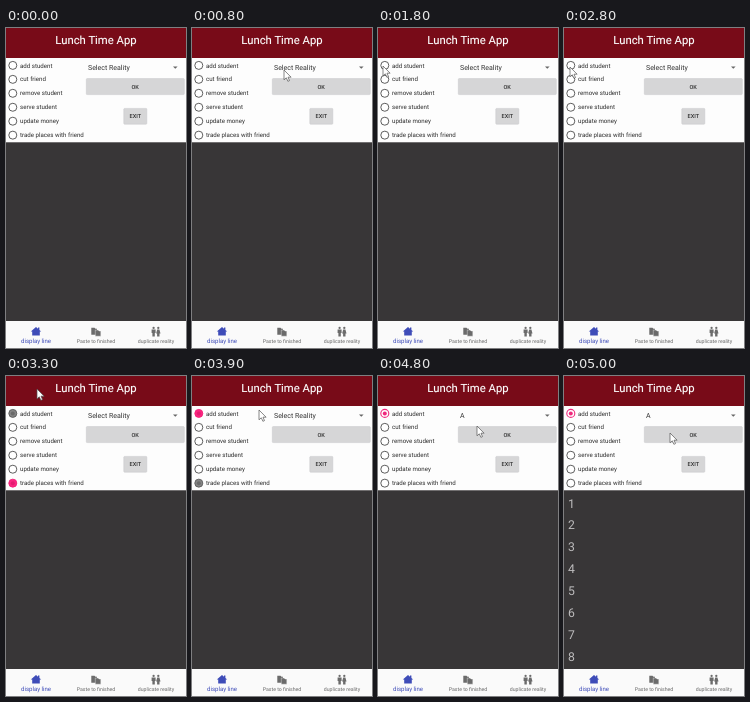
Animation, 180 px wide and 320 px high, one loop 5.1 s. Source, as an HTML page:

```html
<!DOCTYPE html>
<html lang="en">
<head>
<meta charset="utf-8">
<title>Lunch Time App</title>
<style>
  html, body { margin: 0; width: 100%; height: 100%; overflow: hidden; background: #fff; }
  svg { display: block; width: 100%; height: 100%; }
  text { font-family: Roboto, sans-serif; text-rendering: geometricPrecision; }
  .menu { font-size: 7px; fill: #333; }
  .label { font-size: 6.15px; fill: #2c2c2c; }
  .button { font-size: 5.6px; font-weight: 500; fill: #333; text-anchor: middle; }
  .tab { font-size: 5.2px; fill: #686868; text-anchor: middle; }
  .tab.active { font-size: 6.05px; fill: #3e4cb8; }
  .number { font-size: 12.2px; fill: #bdbcbd; }
  .ring { fill: #fff; stroke: #4c4c4c; stroke-width: 0.9; }
  .dot { fill: none; }
  .on .ring { stroke: #f0287c; stroke-width: 1.1; }
  .on .dot { fill: #f0287c; }
  .press .ring { fill: #fb2581; stroke: #f32078; }
  .press .dot { fill: #e31b70; }
  .fade .ring { fill: #858585; stroke: #5c5c5c; }
  .fade .dot { fill: #6a6a6a; }
</style>
</head>
<body>
<svg viewBox="0 0 180 320" preserveAspectRatio="none">
  <rect width="180" height="320" fill="#fdfdfd"/>
  <rect width="180" height="30" fill="#780b18"/>
  <text x="90" y="16.4" text-anchor="middle" font-size="11.3" fill="#fff" stroke="#fff" stroke-width=".15">Lunch Time App</text>

  <g id="radios"></g>

  <text id="choice" class="menu" x="82" y="42">Select Reality</text>
  <path d="M167 38.4h4.6l-2.3 2.3z" fill="#666"/>
  <g fill="#d6d6d7" stroke="#c6c6c8" stroke-width=".5">
    <rect x="80.3" y="50.6" width="98" height="16" rx=".8"/>
    <rect x="117.8" y="80.4" width="23" height="15.8" rx=".8"/>
  </g>
  <text class="button" x="129.2" y="60.7">OK</text>
  <text class="button" x="129.3" y="90.3">EXIT</text>

  <rect y="114.3" width="180" height="179" fill="#383637"/>
  <g id="list"></g>

  <rect y="293" width="180" height="27" fill="#fafafa"/>
  <path d="M24.8 303.6 30 299l2 1.7v-1.1h1.4v2.3l1.8 1.7h-1.4v3.9h-7.6v-3.9z" fill="#3e4cb8"/>
  <g fill="#6b6b6b">
    <path d="M85.3 299.8h3.2l1 1h1.5v6h-5.7z"/>
    <path d="M89.3 302h2.8l1 1h1.7v5.2h-5.5z" stroke="#fafafa" stroke-width=".4"/>
    <circle cx="147.6" cy="299.9" r="1.15"/>
    <circle cx="152.3" cy="299.9" r="1.15"/>
    <path d="M145.6 301.4h4v3.5h-.8v3.5h-2.4v-3.5h-.8z"/>
    <path d="M151.2 301.4h2.2l1.1 4h-1v3h-2.4v-3h-1z"/>
  </g>
  <text class="tab active" x="30" y="315.4">display line</text>
  <text class="tab" x="90" y="315.2">Paste to finished</text>
  <text class="tab" x="150" y="315.2">duplicate reality</text>

  <g id="popup">
    <rect x="78.2" y="30.4" width="81.8" height="30" fill="#000" opacity=".13"/>
    <rect x="78.8" y="29.8" width="80.4" height="29.8" fill="#fdfdfd" stroke="#d2d2d2" stroke-width=".4"/>
    <text class="menu" x="82" y="37.8">Select Reality</text>
    <text class="menu" x="82" y="47.2">A</text>
    <text class="menu" x="82" y="56.7">B</text>
  </g>

  <path id="cursor" d="M0 0V9.8L2.3 7.8 3.9 11.3 5.5 10.6 4 7.2H7.1z" fill="#fff" stroke="#555" stroke-width=".7" stroke-linejoin="round"/>
</svg>
<script>
  const LOOP = 5100, STEP = 100;
  const $ = id => document.getElementById(id);

  const labels = ['add student', 'cut friend', 'remove student',
    'serve student', 'update money', 'trade places with friend'];
  $('radios').innerHTML = labels.map((label, i) => {
    const y = 37.4 + i * 13.95;
    return `<g><circle class="ring" cx="6.8" cy="${y}" r="4"/>
      <circle class="dot" cx="6.8" cy="${y}" r="2"/>
      <text class="label" x="14" y="${y + 2.1}">${label}</text></g>`;
  }).join('');
  $('list').innerHTML = Array.from({ length: 8 }, (_, i) =>
    `<text class="number" x="4" y="${131.5 + i * 21.87}">${i + 1}</text>`).join('');

  const radios = $('radios').children;
  const add = radios[0], trade = radios[5];

  // Each entry: start time, then the value held until the next entry.
  const path = [
    [800, 92, 42], [900, 68, 41], [1000, 40, 40], [1100, 18, 38], [1200, 8, 37],
    [1400, 7, 38], [1500, 5, 38], [1900, 6, 39],
    [3000, 9, 74], [3100, 8, 109], [3200, 20, 60], [3300, 31, 13],
    [3400, 28, 10], [3500, 18, 26], [3600, 8, 37],
    [3900, 67, 34], [4000, 82, 36], [4100, 94, 39], [4200, 98, 40],
    [4500, 94, 43], [4800, 99, 50], [4900, 106, 57]
  ];
  const addStates = [[2900, 'press'], [3000, 'on'], [3200, 'fade'], [3400, ''],
    [3600, 'press'], [4000, 'on']];
  const tradeStates = [[3200, 'press'], [3400, 'on'], [3600, 'fade'], [4000, '']];

  const at = (track, t) => track.filter(k => k[0] <= t).pop();
  const state = (track, t) => (at(track, t) || [0, ''])[1];
  const show = (el, on) => el.setAttribute('visibility', on ? 'visible' : 'hidden');

  function draw(now) {
    const t = Math.floor(now % LOOP / STEP) * STEP;
    const pos = at(path, t);
    show($('cursor'), pos);
    if (pos) $('cursor').setAttribute('transform', `translate(${pos[1]} ${pos[2]})`);
    add.setAttribute('class', state(addStates, t));
    trade.setAttribute('class', state(tradeStates, t));
    show($('popup'), t >= 4400 && t < 4600);
    show($('list'), t >= 5000);
    $('choice').textContent = t >= 4600 ? 'A' : 'Select Reality';
  }

  const start = performance.now();
  function tick() {
    draw(performance.now() - start);
    requestAnimationFrame(tick);
  }
  tick();
</script>
</body>
</html>
```
